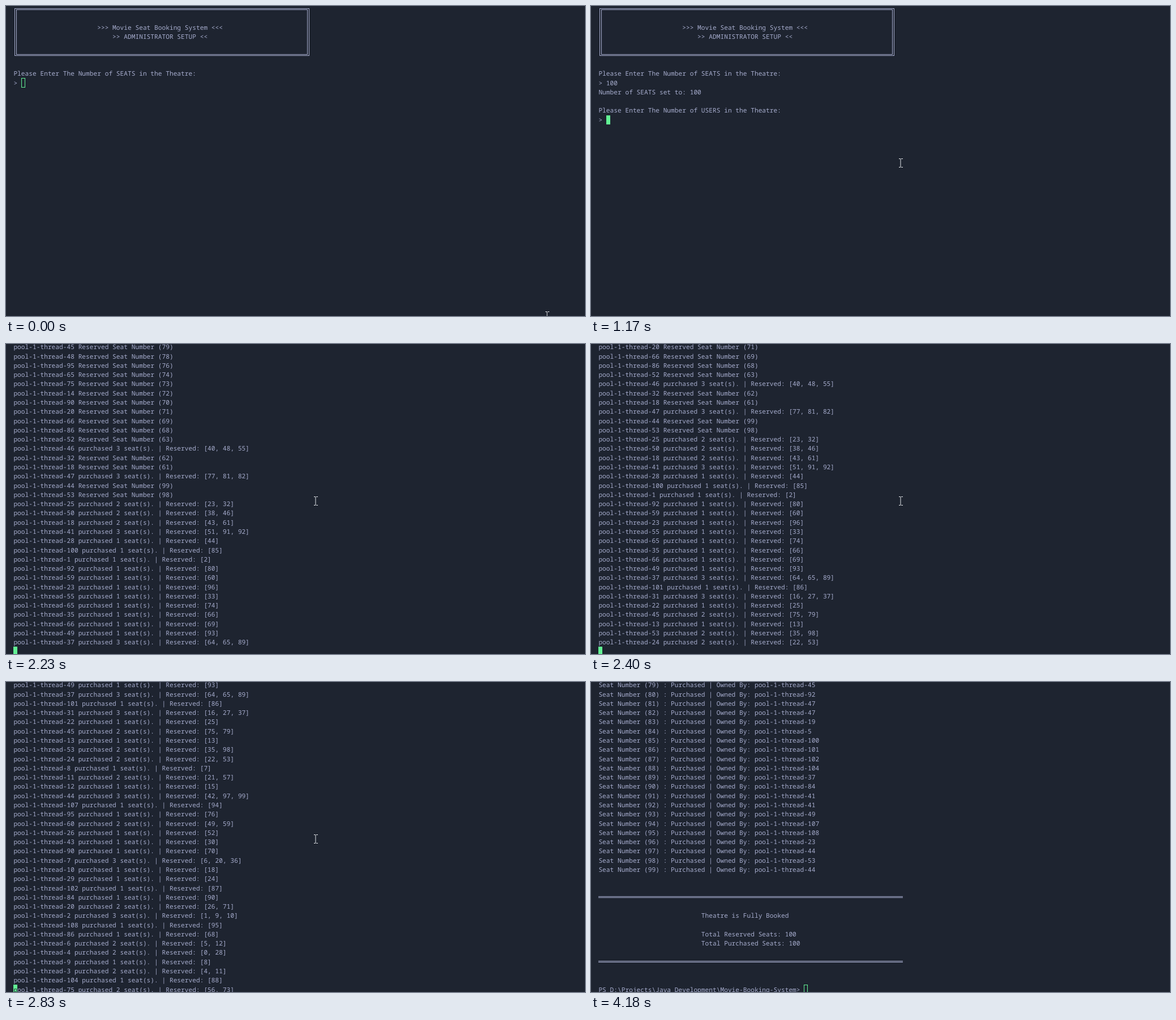
An HTML page with a canvas that plays this animation: 1023x547 px, repeating every 4.29 s.

```html
<!DOCTYPE html>
<html lang="en">
<head>
<meta charset="utf-8">
<title>Seat booking terminal</title>
<style>
  html, body { margin: 0; width: 100%; height: 100%; overflow: hidden; background: #1e2430; }
  canvas { display: block; }
</style>
</head>
<body>
<canvas id="stage" width="1023" height="547"></canvas>
<script>
const ctx = document.getElementById('stage').getContext('2d');
const LOOP = 4290, LEFT = 13.4, TOP = -2.85, CELL = 6.72, ROW = 16.28, LAST_ROW = 33;
const BACK = '#1e2430', TEXT = '#a6accd', GREEN = '#62f294', RULE = '═';
const PROMPT = 'PS D:\\Projects\\Java Development\\Movie-Booking-System> ';

// Purchases as thread:seats, in the order they are logged
const parse = text => text.trim().split(/\s+/).map(entry => {
  const [thread, seats] = entry.split(':');
  return { thread: +thread, seats: seats.split(',').map(Number) };
});
const sales = [
  ...parse(`46:40,48,55 47:77,81,82 25:23,32 50:38,46 18:43,61 41:51,91,92 28:44 100:85 1:2
    92:80 59:60 23:96 55:33 65:74 35:66 66:69 49:93 37:64,65,89`),
  ...parse(`101:86 31:16,27,37 22:25 45:75,79 13:13 53:35,98 24:22,53 8:7 11:21,57 12:15
    44:42,97,99 107:94 95:76 60:49,59 26:52 43:30 90:70 7:6,20,36 10:18 29:24 102:87 84:90
    20:26,71 2:1,9,10 108:95 86:68 6:5,12 4:0,28 9:8 3:4,11 104:88 75:56,73`),
];
const lateSales = parse('32:62 52:63 14:72 48:78 19:83 5:84 17: 21:');
lateSales.slice(6).forEach(sale => sale.seats = []);
const allSeats = [...Array(100).keys()];
const taken = new Set([...sales, ...lateSales].flatMap(sale => sale.seats));
allSeats.filter(seat => !taken.has(seat))
  .forEach((seat, i) => lateSales[i % lateSales.length].seats.push(seat));
sales.push(...lateSales);

const owner = [];
for (const { thread, seats } of sales) {
  seats.sort((a, b) => a - b).forEach(seat => owner[seat] = thread);
}

const reserved = seat => `pool-1-thread-${owner[seat]} Reserved Seat Number (${seat})`;
const purchased = ({ thread, seats }) =>
  `pool-1-thread-${thread} purchased ${seats.length} seat(s). | Reserved: [${seats.join(', ')}]`;
const owned = seat => `Seat Number (${seat}) : Purchased | Owned By: pool-1-thread-${owner[seat]}`;
const indent = (count, text) => ' '.repeat(count) + text;

const lastSeats = [79, 78, 76, 74, 73, 72, 70, 71, 69, 68, 63, 62, 61, 99, 98];
const saleLines = sales.map(purchased);
const lastLines = lastSeats.map(reserved);
const lines = [
  '', '', indent(22, '>>> Movie Seat Booking System <<<'), indent(26, '>> ADMINISTRATOR SETUP <<'), '', '', '',
  'Please Enter The Number of SEATS in the Theatre:', '> 100', 'Number of SEATS set to: 100', '',
  'Please Enter The Number of USERS in the Theatre:', '> 200', 'Number of USERS set to: 200', '',
  ...allSeats.filter(seat => !lastSeats.includes(seat)).map(reserved),
  ...lastLines.slice(0, 11), saleLines[0],
  ...lastLines.slice(11, 13), saleLines[1],
  ...lastLines.slice(13), ...saleLines.slice(2),
  '', '', ...allSeats.map(owned),
  '', '', RULE, '', indent(27, 'Theatre is Fully Booked'), '',
  indent(27, 'Total Reserved Seats: 100'), indent(27, 'Total Purchased Seats: 100'), '', RULE, '', '',
];

// Output speed: [time, lines printed, screen updates until the next entry]
const output = [[1910, 15, 8], [2230, 133, 9], [2580, 149, 6], [2830, 164, 4], [2970, 180, 3], [3090, 287, 1]];

function printedLines(t) {
  const i = output.findLastIndex(([time]) => t >= time);
  const [start, from, steps] = output[i];
  if (i === output.length - 1) return from;
  const [end, to] = output[i + 1];
  const step = Math.floor((t - start) / (end - start) * steps + 1e-6);
  return Math.round(from + (to - from) * step / steps);
}

const typed = (text, times, t) => '> ' + text.slice(0, times.filter(time => t >= time).length);

// The line holding the cursor, its text and the cursor column
function terminalState(t) {
  if (t < 1170) {
    const text = typed('100', [640, 860, 970], t);
    return { line: 8, text, col: text.length };
  }
  if (t < 1910) {
    const text = typed('200', [1540, 1650, 1750], t);
    return { line: 12, text, col: text.length };
  }
  const line = printedLines(t);
  if (t >= 3090) return { line, text: PROMPT, col: PROMPT.length };
  return { line, text: t >= 2830 && t < 2860 ? lines[line] : '', col: 0 };
}

const rowTop = row => TOP + row * ROW;

function drawText(text, row, col = 0) {
  [...text].forEach((char, i) => {
    if (char !== ' ') ctx.fillText(char, LEFT + (col + i) * CELL, rowTop(row) + 12.2);
  });
}

function drawLine(text, row) {
  if (text !== RULE) return drawText(text, row);
  const y = Math.round(rowTop(row) + ROW / 2 - 1.7);
  ctx.fillRect(13, y, 538, 1);
  ctx.fillRect(13, y + 2, 538, 1);
}

function drawHeaderBox(offset) {
  const y = Math.round(-offset * ROW);
  ctx.strokeStyle = TEXT;
  ctx.strokeRect(15.5, y + 4.5, 520, 83);
  ctx.strokeRect(18.5, y + 6.5, 514, 79);
}

function drawCursor({ text, col }, row, focused) {
  const x = Math.round(LEFT + col * CELL), y = Math.round(rowTop(row));
  const w = Math.round(LEFT + (col + 1) * CELL) - x, h = Math.round(rowTop(row + 1)) - y;
  if (!focused) {
    ctx.strokeStyle = GREEN;
    ctx.strokeRect(x + .5, y + .5, w - 1, h - 1);
    return;
  }
  ctx.fillStyle = GREEN;
  ctx.fillRect(x, y, w, h);
  ctx.fillStyle = BACK;
  drawText(text.charAt(col), row, col);
}

function drawPointer(t) {
  const move = (start, step, count, [x1, y1], [x2, y2]) => {
    const p = t < start ? 0 : Math.min(1, (Math.floor((t - start) / step) + 1) / count);
    const e = p * p * (3 - 2 * p);
    return [x1 + (x2 - x1) * e, y1 + (y2 - y1) * e].map(Math.round);
  };
  const rest = [547, 277];
  const [x, y] = t < 3460 ? move(30, 40, 10, [956, 547], rest) : move(3460, 35.3, 14, rest, [940, 558]);
  ctx.fillStyle = '#e4e6ea';
  ctx.fillRect(x - .5, y - 7, 1, 14);
  for (const edge of [y - 8, y + 7]) {
    ctx.fillRect(x - 3, edge, 3, 1);
    ctx.fillRect(x + 1, edge, 3, 1);
  }
}

function draw(t) {
  const state = terminalState(t);
  const offset = Math.max(0, state.line - LAST_ROW);
  ctx.fillStyle = BACK;
  ctx.fillRect(0, 0, 1023, 547);
  ctx.font = '11.2px "Noto Sans Mono", monospace';
  ctx.textRendering = 'geometricPrecision';
  ctx.fillStyle = TEXT;
  for (let i = offset; i < state.line; i++) drawLine(lines[i], i - offset);
  drawLine(state.text, state.line - offset);
  if (offset < 6) drawHeaderBox(offset);
  drawCursor(state, state.line - offset, t >= 430 && t < 4180);
  drawPointer(t);
}

function frame() {
  draw(performance.now() % LOOP);
  requestAnimationFrame(frame);
}
frame();
</script>
</body>
</html>
```
